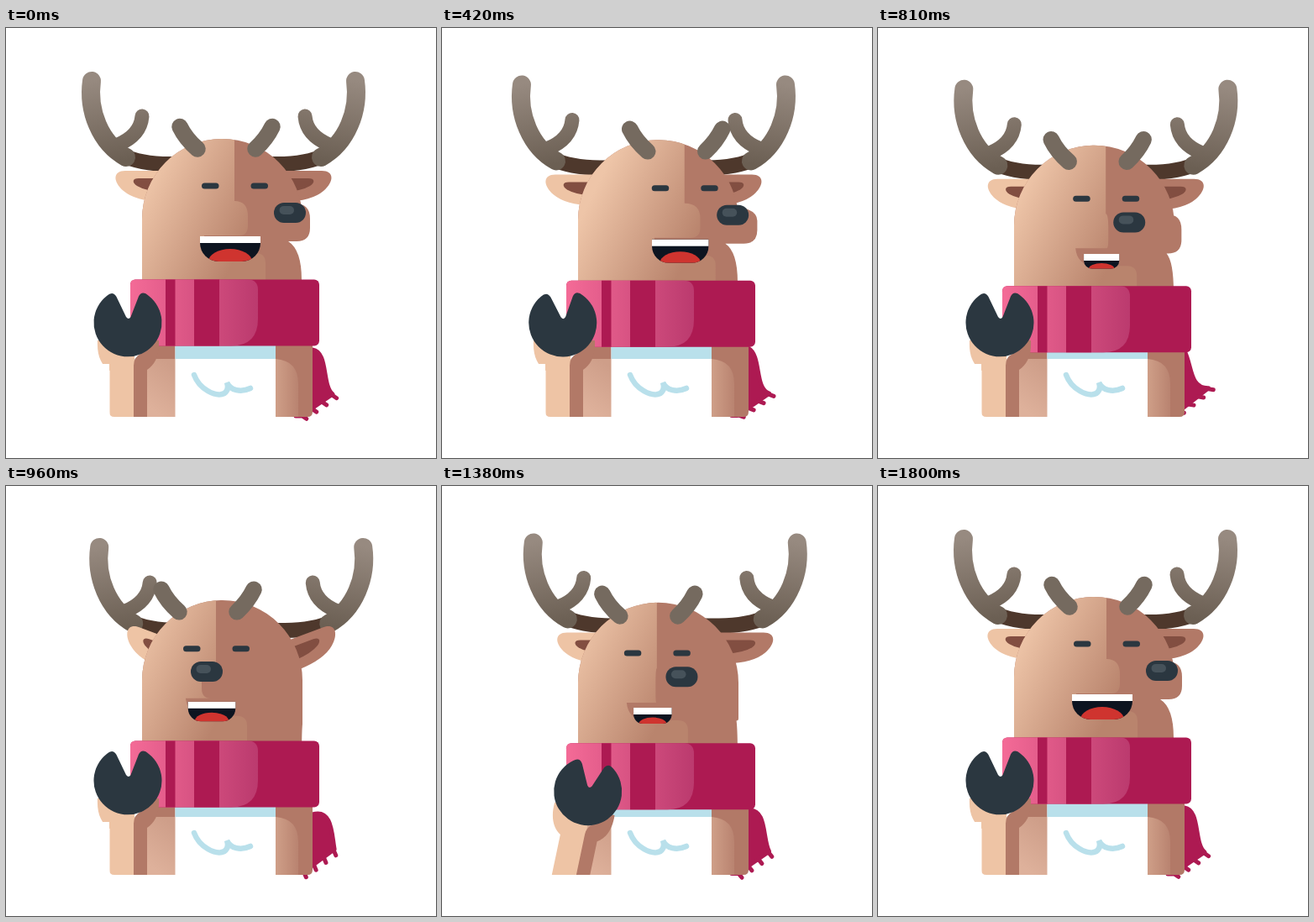
An HTML page that plays this animation: 512x512 px, repeating every 1.83 s.

```html
<!DOCTYPE html>
<html lang="en">
<head>
<meta charset="utf-8">
<title>Laughing reindeer</title>
<style>
  html, body { margin: 0; width: 100%; height: 100%; overflow: hidden; background: #fff; }
  svg { display: block; width: 100%; height: 100%; }
  .light { fill: #eec4a5; }
  .shade { fill: #b27967; }
  .dark { fill: #2b3740; }
  .berry { fill: #ad1a52; stroke: #ad1a52; }
  .line { fill: none; stroke-linecap: round; }
</style>
</head>
<body>
<svg viewBox="0 0 512 512">
  <defs>
    <linearGradient id="horn" gradientUnits="userSpaceOnUse" x1="110" y1="60" x2="130" y2="160">
      <stop stop-color="#978a80"/><stop offset="1" stop-color="#6b5f53"/>
    </linearGradient>
    <linearGradient id="fur" gradientUnits="userSpaceOnUse" x1="170" y1="180" x2="290" y2="240">
      <stop stop-color="#eec5a8"/><stop offset="1" stop-color="#b9846d"/>
    </linearGradient>
    <linearGradient id="wool" gradientUnits="userSpaceOnUse" x1="148" y1="0" x2="300" y2="0">
      <stop stop-color="#f46b97"/><stop offset="1" stop-color="#bb3a6e"/>
    </linearGradient>
    <linearGradient id="flankL" gradientUnits="userSpaceOnUse" x1="168" y1="450" x2="202" y2="405">
      <stop stop-color="#deb19b"/><stop offset="1" stop-color="#ce9e89"/>
    </linearGradient>
    <linearGradient id="flankR" gradientUnits="userSpaceOnUse" x1="321" y1="0" x2="348" y2="0">
      <stop stop-color="#cf9f88"/><stop offset="1" stop-color="#b98370"/>
    </linearGradient>
    <clipPath id="headClip"><path id="headShape"/></clipPath>
    <clipPath id="mouthClip"><path id="mouthShape"/></clipPath>
    <clipPath id="floor"><path d="M60 200H300V463H129Q123 463 123 457V400H60Z"/></clipPath>
    <g id="antler" class="line">
      <path d="M137 151Q160 162 195 162H230" stroke="#4e382c" stroke-width="18"/>
      <path d="M102 63C97 98 112 137 143 154" stroke="url(#horn)" stroke-width="22"/>
      <path d="M162 105Q160 128 133 139" stroke="url(#horn)" stroke-width="17"/>
    </g>
    <g id="ear">
      <path fill="currentColor" d="M200 170H142C127 170 127 183 140 194Q154 206 186 207H200Z"/>
      <path fill="#824e41" d="M200 179H158C150 179 150 184 156 188Q166 194 186 195H200Z"/>
    </g>
  </defs>

  <path id="tail" class="berry" stroke-width="5" stroke-linejoin="round"/>
  <path id="fringe" class="berry line" stroke-width="5"/>

  <g id="back">
    <use href="#antler"/>
    <use href="#antler" transform="translate(518) scale(-1 1)"/>
    <g color="#eec4a5"><use id="earL" href="#ear"/></g>
    <g color="#b27967" transform="translate(518) scale(-1 1)"><use id="earR" href="#ear"/></g>
  </g>

  <g clip-path="url(#headClip)">
    <rect class="shade" x="150" y="100" width="240" height="260"/>
    <path id="furShape" fill="url(#fur)"/>
  </g>

  <g id="face">
    <g class="line" stroke="#756a5f" stroke-width="19.500">
      <path d="M207 117.500Q214 132 228 144"/>
      <path d="M317 117.500Q310 132 297 144"/>
    </g>
    <g class="dark">
      <rect x="233" y="184.500" width="20.500" height="7" rx="3.500"/>
      <rect x="291.500" y="184.500" width="20.500" height="7" rx="3.500"/>
    </g>
    <g clip-path="url(#mouthClip)">
      <rect x="220" y="240" width="94" height="60" fill="#0d1420"/>
      <ellipse id="tongue" cx="267" fill="#cf342f"/>
      <rect id="teeth" x="220" width="94" height="8" fill="#fff"/>
    </g>
  </g>
  <g id="nose">
    <rect class="dark" x="-19" y="-12" width="38" height="24" rx="12"/>
    <rect x="-12.500" y="-8" width="17.500" height="10" rx="5" fill="#46525a"/>
  </g>

  <path class="shade" d="M168 370H365V457Q365 463 359 463H168Z"/>
  <path fill="url(#flankL)" d="M160 463V394H202V463Z"/>
  <path fill="url(#flankR)" d="M321 463V394Q348 396 348 424V463Z"/>
  <path fill="#fff" d="M201.500 370H321V463H201.500Z"/>
  <path fill="#b9e0eb" d="M201.500 370H321V394H201.500Z"/>
  <path class="line" stroke="#b9e0eb" stroke-width="6.500" d="M224 413C230 430 250 440 260 435C266 431 264 425 263 422C267 432 280 434 291 429"/>

  <g id="scarf" fill="#ad1a52">
    <rect x="148" y="299.500" width="225" height="79" rx="6"/>
    <path fill="url(#wool)" d="M154 299.500H288Q300 299.500 300 312V346Q300 378.500 268 378.500H154Q148 378.500 148 372.500V305.500Q148 299.500 154 299.500Z"/>
    <path d="M190 299.500H201.500V378.500H190ZM224 299.500H254V378.500H224Z"/>
  </g>

  <g clip-path="url(#floor)">
    <g id="arm">
      <path class="light" d="M109 372C108 391 114 402 123.500 408V500H153V372Z"/>
      <path class="shade" d="M182 372C183 391 177 401 168 407V500H152V402Q152 392 160 388V372Z"/>
      <path id="paw" class="dark" d="M120 319Q127 312.500 131.500 320L143 344Q146 348 148.500 344L158 319.500Q162 312 170 319A40.500 40.500 0 1 1 120 319Z"/>
    </g>
  </g>
</svg>
<script>
const LOOP = 1830, STEP = 30;
const LAUGH = 600, FLICK = 750, SLAP = 1200, SWAY = 450;
const TAU = 2 * Math.PI;
const $ = id => document.getElementById(id);
const set = (id, name, value) => $(id).setAttribute(name, value);
const move = (id, x, y) => set(id, 'transform', `translate(${x} ${y})`);

// A soft bump from 0 to 1 and back, lasting `span` ms.
const pulse = (t, from, span) => {
  const u = Math.min(Math.max((t - from) / span, 0), 1);
  return Math.sin(Math.PI * u) ** 2;
};

// Smooth curve through [time, value] keys that never overshoots them.
function track(...keys) {
  const slope = i => (keys[i + 1][1] - keys[i][1]) / (keys[i + 1][0] - keys[i][0]);
  const tangent = i => {
    if (i === 0 || i === keys.length - 1) return 0;
    const a = slope(i - 1), b = slope(i);
    return a * b <= 0 ? 0 : 2 * a * b / (a + b);
  };
  return t => {
    const i = keys.findIndex((_, k) => k === keys.length - 2 || t < keys[k + 1][0]);
    const [x0, y0] = keys[i], [x1, y1] = keys[i + 1];
    const h = x1 - x0, u = (t - x0) / h, v = 1 - u;
    return v * v * (1 + 2 * u) * y0 + u * u * (3 - 2 * u) * y1
      + h * u * v * (v * tangent(i) - u * tangent(i + 1));
  };
}

const headTurn = track([0, 0], [210, 13], [480, 17], [690, 13], [960, -22], [1090, -28], [1530, -8.5], [1800, 0]);
const noseShift = track([0, 0], [210, 10], [690, 1], [960, -99], [1100, -108], [1530, -21], [1800, 0]);

function drawTail(t) {
  const a = TAU * t / SWAY, s = (1 - Math.cos(a)) / 2, q = Math.sin(a);
  const rx = 389 + 13 * s, ry = 436 - 21 * s, lx = 351 + 16 * s, ly = 462 - 12 * s;
  set('tail', 'd', `M345 ${383 + 21 * s + 6 * q}h20`
    + `C${384 - 7 * s + 8 * q} ${386 + 24 * s - 8 * q} ${376 + 18 * s + 12 * q} ${426 - 18 * s - 10 * q} ${rx} ${ry}`
    + `L${lx} ${ly}H345Z`);

  const droop = Math.atan2(rx - lx, ly - ry) + 0.75 * Math.cos(a - TAU / 3);
  const dx = 7 * Math.cos(droop), dy = 7 * Math.sin(droop);
  let d = '';
  for (let k = 0.03; k < 1; k += 0.315) {
    d += `M${rx + (lx - rx) * k} ${ry + (ly - ry) * k}l${dx} ${dy}`;
  }
  set('fringe', 'd', d);
}

function drawHead(laugh, turn, nod, nose) {
  const left = Math.max(0, -turn - 6);
  const side = 227.5 + 8 * laugh;
  const snout = 353 + Math.max(0, 9 + 0.8 * turn), top = 209 + 0.85 * nod;
  const end = 254 + 0.95 * nod + 1.5 * left;
  const chin = Math.min(353, 336 + 0.5 * nod + 0.9 * left);
  const r = Math.min(16, snout - chin);
  const bump = snout > 353
    ? `L${706 - snout} ${top}Q${snout} ${top} ${snout} ${top + 18}` : '';
  set('headShape', 'd', `M162 350V${side}A95.5 95.5 0 0 1 353 ${side}${bump}`
    + `V${end - r}Q${snout} ${end} ${snout - r} ${end}`
    + `H${chin}Q352 ${end + 10} 352 ${end + 46}V350Z`);

  const bulge = 16 + nose / 3, edge = 272 + bulge;
  set('furShape', 'd', `M100 80H272V206Q${edge} 206 ${edge} 224V235Q${edge} 247 ${272 + bulge * 0.4} 247`
    + 'H236Q238 268 260 268H297Q309 268 309 280V360H100Z');
  move('furShape', turn, nod);
  move('face', turn, nod);
  move('nose', 338 + nose, 220 + 0.85 * nod + 0.04 * nose);
}

function drawMouth(laugh) {
  const w = 72 - 31 * laugh, h = 30 - 13 * laugh, y = 248 + 6 * laugh;
  const r = Math.min(h - 8, w / 2);
  set('mouthShape', 'd', `M${267 - w / 2} ${y}h${w}v8a${r} ${r} 0 0 1 ${-r} ${r}h${2 * r - w}a${r} ${r} 0 0 1 ${-r} ${-r}Z`);
  set('tongue', 'cy', y + h);
  set('tongue', 'rx', w * 0.36);
  set('tongue', 'ry', (h - 8) * 0.68);
  set('teeth', 'y', y);
}

function draw(t) {
  const laugh = pulse(t % LAUGH, 0, 480);
  const turn = headTurn(t), nod = laugh * (16 + 0.2 * turn);
  drawTail(t);
  drawHead(laugh, turn, nod, noseShift(t));
  drawMouth(laugh);
  move('scarf', 0, 8 * laugh);
  move('back', -0.42 * turn, 5 - 5 * Math.cos(TAU * t / 1800));

  const ear = 24 * pulse(t % FLICK, 60, 240);
  for (const id of ['earL', 'earR']) set(id, 'transform', `rotate(${ear} 178 185)`);

  const slap = t % SLAP, tilt = 13 * pulse(slap, 50, 320);
  set('arm', 'transform', `translate(0 ${tilt * 0.82}) rotate(${tilt} 145 490)`);
  set('paw', 'transform', `rotate(${-11 * pulse(slap, 210, 240)} 150 395)`);
}

const start = performance.now();
function tick() {
  const t = (performance.now() - start) % LOOP;
  draw(Math.floor(t / STEP) * STEP);
  requestAnimationFrame(tick);
}
tick();
</script>
</body>
</html>
```
